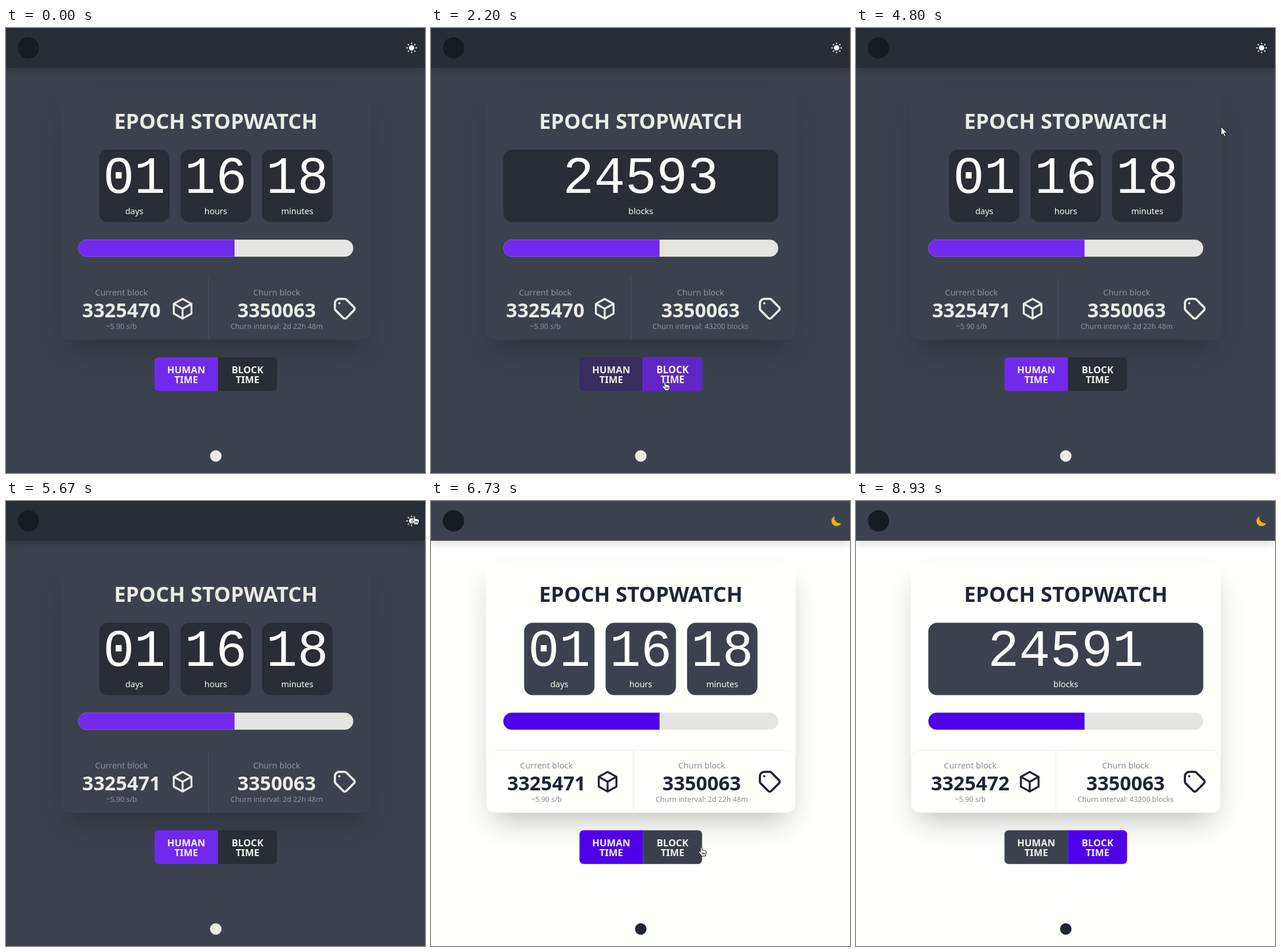
Write an HTML page with a canvas that moves like this. It is 726 px wide and 772 px high and loops after 9670 ms.

```html
<!DOCTYPE html>
<html lang="en">
<head>
<meta charset="utf-8">
<title>Epoch stopwatch</title>
<style>
  html, body { margin: 0; width: 726px; height: 772px; overflow: hidden; background: #3c424d; }
  canvas { display: block; }
</style>
</head>
<body>
<canvas id="stage" width="726" height="772"></canvas>
<script>
const ctx = document.getElementById('stage').getContext('2d');
const LOOP = 9670, FPS = 15;
const SANS = '"Noto Sans", "Open Sans", sans-serif';
const MONO = '"Liberation Mono", monospace';

const DARK = {
  page: [60, 66, 77], neutral: [41, 45, 53], hover: [20, 23, 27], primary: [113, 41, 237],
  ink: [235, 236, 230], label: '#8e9197', line: '#4b505a', navShadow: 0.22
};
const LIGHT = {
  page: [255, 255, 251], neutral: [60, 66, 77], hover: [41, 45, 53], primary: [79, 0, 232],
  ink: [31, 38, 50], label: '#8b8e95', line: '#e9e9e5', navShadow: 0.14
};

// State changes: [tick, value, ticks already elapsed when it becomes visible]
const modes = [[0, 'human', 99], [32, 'block', 0.6], [63, 'human', 0.6], [114, 'block', 1.6]];
const themes = [[0, DARK, 99], [86, LIGHT, 0.9]];
const humanFill = [[0, 'primary', 99], [32, 'neutral', 0.5], [51, 'hover', 0.5], [63, 'primary', 0.5], [114, 'neutral', 1.9]];
const blockFill = [[0, 'neutral', 99], [23, 'hover', 0.5], [32, 'primary', 0.6], [63, 'neutral', 0.5],
  [101, 'hover', 0.5], [114, 'primary', 1.8]];

// Pointer moves: [first tick, last tick, x, y]
const OFF = -99;
const moves = [
  [5, 5, 55, 48], [7, 7, 45, 82], [14, 14, 43, 173], [16, 16, 158, 589], [17, 17, OFF, OFF],
  [19, 19, 342, 747], [20, 23, 400, 625], [24, 27, 400, 613], [48, 55, 309, 602], [66, 69, 341, 611],
  [72, 72, 632, 171], [74, 74, 658, 99], [77, 80, 702, 25], [91, 93, 618, 424], [96, 96, 615, 565],
  [99, 102, 412, 612], [105, 107, 408, 603], [118, 119, 423, 607], [121, 122, 527, 648],
  [124, 125, 631, 690], [127, 127, 645, 600], [128, 130, 588, 28], [134, 134, OFF, OFF]
];

const lerp = (a, b, p) => a + (b - a) * p;
const clamp = v => Math.max(0, Math.min(1, v));
const mix = (a, b, p) => a.map((v, i) => lerp(v, b[i], p));
const css = c => `rgb(${c.map(Math.round).join()})`;

// cubic-bezier(.4, 0, .2, 1)
function ease(x) {
  let lo = 0, hi = 1, s = 0.5;
  for (let i = 0; i < 16; i++) {
    s = (lo + hi) / 2;
    const u = 1 - s;
    if (3 * u * u * s * 0.4 + 3 * u * s * s * 0.2 + s ** 3 < x) lo = s; else hi = s;
  }
  return 3 * (1 - s) * s * s + s ** 3;
}

function stateAt(events, n) {
  let i = events.length - 1;
  while (events[i][0] > n) i--;
  const [tick, value, lead] = events[i];
  const age = n - tick + lead;
  return { value, before: events[Math.max(0, i - 1)][1], age, p: ease(clamp(age / 3)) };
}

function pointerAt(n) {
  let x = OFF, y = OFF;
  for (const [from, to, tx, ty] of moves) {
    if (n < from) break;
    const p = clamp((n - from + 1) / (to - from + 1));
    x = lerp(x, tx, p);
    y = lerp(y, ty, p);
  }
  return [Math.round(x), Math.round(y)];
}

function box(x, y, w, h, r, fill) {
  ctx.beginPath();
  ctx.roundRect(x, y, w, h, r);
  ctx.fillStyle = fill;
  ctx.fill();
}

function shadowBox(x, y, w, h, r, dy, blur, alpha, fill) {
  ctx.save();
  ctx.shadowColor = `rgba(0,0,0,${alpha})`;
  ctx.shadowBlur = blur;
  ctx.shadowOffsetY = dy;
  box(x, y, w, h, r, fill);
  ctx.restore();
}

function disc(x, y, r, fill) {
  ctx.beginPath();
  ctx.arc(x, y, r, 0, 7);
  ctx.fillStyle = fill;
  ctx.fill();
}

function text(str, x, y, size, fill, weight = 400, family = SANS) {
  ctx.font = `${weight} ${size}px ${family}`;
  ctx.textAlign = 'center';
  ctx.fillStyle = fill;
  ctx.fillText(str, x, y);
}

const cubePath = new Path2D('M12 2l9 5v10l-9 5-9-5V7zM3 7l9 5 9-5M12 12v10');
const tagPath = new Path2D('M7 7h.01M7 3h5c.512 0 1.024.195 1.414.586l7 7a2 2 0 010 2.828l-7 7a2 2 0 01-2.828 0l-7-7A2 2 0 013 12V7a4 4 0 014-4z');
const moonPath = new Path2D('M699 26.5A9 9 0 1 0 711 38.5A10 10 0 0 1 699 26.5z');
const arrowPath = new Path2D('M.5 .5V15L4 12L6.3 17.3L8.8 16.2L6.5 11H11z');
const handPath = new Path2D('M4 9V2Q4 .5 5.3 .5T6.8 2V5.5Q8.5 4.6 9.2 6Q11 5.3 11.6 6.8Q13.8 6.3 13.8 8.5V11.5L12.5 14V16H4.8V14L1 10Q.2 8.4 1.6 7.8Q2.8 7.6 4 9z');

function icon(path, x, y, scale, color) {
  ctx.save();
  ctx.translate(x, y);
  ctx.scale(scale, scale);
  ctx.translate(-12, -12);
  ctx.lineWidth = 2;
  ctx.lineCap = ctx.lineJoin = 'round';
  ctx.strokeStyle = color;
  ctx.stroke(path);
  ctx.restore();
}

function sun(x, y) {
  disc(x, y, 4.7, '#fff');
  ctx.strokeStyle = '#fff';
  ctx.lineWidth = 2;
  ctx.lineCap = 'round';
  ctx.beginPath();
  for (let i = 0; i < 8; i++) {
    const c = Math.cos(i * Math.PI / 4), s = Math.sin(i * Math.PI / 4);
    ctx.moveTo(x + c * 7.5, y + s * 7.5);
    ctx.lineTo(x + c * 8.3, y + s * 8.3);
  }
  ctx.stroke();
}

function navbar(theme) {
  shadowBox(0, 0, 726, 69, 0, 5, 14, theme.navShadow, css(theme.neutral));
  disc(39, 34.5, 18.5, '#171c22');
  if (theme === DARK) {
    sun(702.8, 34.5);
  } else {
    ctx.fillStyle = '#e5b013';
    ctx.fill(moonPath);
  }
}

function tile(x, w, value, unit, fill) {
  box(x, 211.3, w, 125.5, 15, fill);
  text(value, x + w / 2, 286, 90, '#fff', 400, MONO);
  text(unit, x + w / 2, 323, 14.4, '#fafaf6');
}

function stat(x, label, value, note, theme) {
  text(label, x, 464, 14.4, theme.label);
  text(value, x, 502, 34, css(theme.ink), 700);
  text(note, x, 522, 12.5, theme.label);
}

function card(theme, human, mined) {
  const page = css(theme.page), ink = css(theme.ink), neutral = css(theme.neutral);
  shadowBox(107, 118, 513, 411, 15, 25, 50, 0.25, page);
  box(95, 106, 537, 435, 15, page);
  text('EPOCH STOPWATCH', 363.5, 175, 36.4, ink, 700);

  if (human) {
    tile(161.3, 122, '01', 'days', neutral);
    tile(302.5, 122, '16', 'hours', neutral);
    tile(443.7, 122, '18', 'minutes', neutral);
  } else {
    tile(125.3, 476.4, String(24593 - mined), 'blocks', neutral);
  }

  box(125.3, 367.3, 476.4, 29.5, 14.75, '#e5e6e1');
  box(125.3, 367.3, 270.7, 29.5, [14.75, 0, 0, 14.75], css(theme.primary));

  if (theme === LIGHT) {
    ctx.beginPath();
    ctx.roundRect(95.5, 432.5, 536, 108, 15);
    ctx.strokeStyle = '#f1f1ed';
    ctx.lineWidth = 1;
    ctx.stroke();
  }
  ctx.fillStyle = theme.line;
  ctx.fillRect(human ? 350 : 346, 432, 1, 109);
  stat(human ? 200 : 198, 'Current block', String(3325470 + mined), '~5.90 s/b', theme);
  stat(human ? 469 : 467, 'Churn block', '3350063',
    'Churn interval: ' + (human ? '2d 22h 48m' : '43200 blocks'), theme);
  icon(cubePath, human ? 306 : 301, 487, 1.7, ink);
  icon(tagPath, 587, 487, 1.9, ink);
}

function popScale(age) {
  const p = clamp(age / 3.75);
  return p < 0.4 ? lerp(0.95, 1.02, p / 0.4) : lerp(1.02, 1, (p - 0.4) / 0.6);
}

function button(x, w, radii, word, events, n, theme, scale) {
  const fill = stateAt(events, n);
  const color = key => mix(theme.before[key], theme.value[key], theme.p);
  const cx = x + w / 2, cy = 600.5;
  ctx.save();
  ctx.translate(cx, cy);
  ctx.scale(scale, scale);
  ctx.translate(-cx, -cy);
  box(x, 571.3, w, 58.4, radii, css(mix(color(fill.before), color(fill.value), fill.p)));
  text(word, cx, 599, 16.6, '#f5f5f0', 700);
  text('TIME', cx, 616, 16.6, '#f5f5f0', 700);
  ctx.restore();
}

function buttons(n, mode, theme) {
  const pop = popScale(mode.age);
  const drawHuman = () => button(257.3, 109.9, [7, 0, 0, 7], 'HUMAN', humanFill, n, theme, mode.value === 'human' ? pop : 1);
  const drawBlock = () => button(367.2, 102.5, [0, 7, 7, 0], 'BLOCK', blockFill, n, theme, mode.value === 'block' ? pop : 1);
  if (mode.value === 'human') { drawBlock(); drawHuman(); } else { drawHuman(); drawBlock(); }
}

function pointer(n) {
  const [x, y] = pointerAt(n);
  if (x < 0) return;
  const hx = x + 5;
  const overButton = hx > 257 && hx < 470 && y > 571 && y < 630;
  const overToggle = hx > 690 && hx < 716 && y > 20 && y < 48;
  const shape = overButton || overToggle ? handPath : arrowPath;
  ctx.save();
  ctx.translate(x, y);
  ctx.fillStyle = '#fff';
  ctx.strokeStyle = '#111';
  ctx.lineWidth = 1;
  ctx.lineJoin = 'round';
  ctx.fill(shape);
  ctx.stroke(shape);
  if (shape === handPath) {
    ctx.beginPath();
    for (const fx of [7, 9, 11]) {
      ctx.moveTo(fx, 10);
      ctx.lineTo(fx, 13);
    }
    ctx.stroke();
  }
  ctx.restore();
}

function draw(ms) {
  const n = Math.floor((ms + 4) * FPS / 1000);
  const mode = stateAt(modes, n), theme = stateAt(themes, n);
  const mined = (n >= 43) + (n >= 129);
  ctx.fillStyle = css(theme.value.page);
  ctx.fillRect(0, 0, 726, 772);
  card(theme.value, mode.value === 'human', mined);
  navbar(theme.value);
  buttons(n, mode, theme);
  disc(363.5, 742.5, 10, css(mix(theme.before.ink, theme.value.ink, theme.p)));
  pointer(n);
}

let start;
function frame(now) {
  start ??= now;
  draw((now - start) % LOOP);
  requestAnimationFrame(frame);
}
draw(0);
requestAnimationFrame(frame);
</script>
</body>
</html>
```
